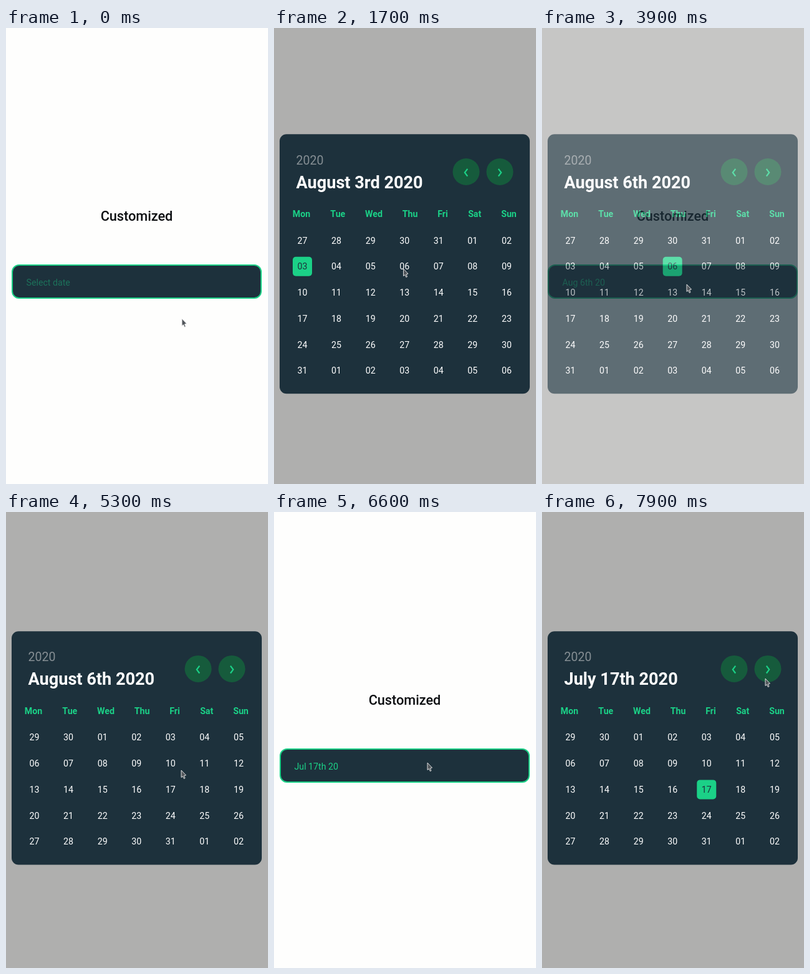
These frames come from a looping animation (420x731 px, 8000 ms). An HTML page:

```html
<!DOCTYPE html>
<html lang="en">
<head>
<meta charset="utf-8">
<title>Date picker</title>
<style>
  html, body { margin: 0; height: 100%; overflow: hidden; background: #fefefd; }
  svg { display: block; width: 100vw; height: 100vh; font: 14.2px Roboto, sans-serif; }
  .mid { text-anchor: middle; }
  .green { fill: #1bd187; }
  .dark { fill: #1d313c; }
  .white { fill: #fff; }
  .title { font-size: 21.7px; font-weight: 500; fill: #0b0d10; }
  .year { font-size: 19.5px; fill: #868f94; }
  .head { font-size: 27.1px; font-weight: 700; }
  .week { font-weight: 700; }
  .chev { fill: none; stroke: #1bd187; stroke-width: 2.2; }
</style>
</head>
<body>
<svg viewBox="0 0 420 731">
  <text class="title mid" x="209.5" y="308.6">Customized</text>
  <rect class="dark" x="10" y="380" width="399" height="53" rx="11" stroke="#1bd187" stroke-width="2"/>
  <text id="input" class="green" x="32.5" y="413"></text>
  <g id="modal">
    <rect width="420" height="731" fill="#000" opacity=".315"/>
    <g id="card"></g>
  </g>
  <path id="cursor" d="M0 0V11.5L2.4 9.6L4.3 13.5L6 12.7L4.4 8.8L7.5 8Z" fill="#50555a" stroke="#eee" stroke-width=".9"/>
</svg>
<script>
const LOOP = 8000, STEP = 100;
const ROW = 41.75, COL = 54.57;
const $ = id => document.getElementById(id);

const picks = [
  { from: 0, input: 'Select date', head: 'August 3rd 2020', date: new Date(2020, 7, 3) },
  { from: 2500, input: 'Aug 6th 20', head: 'August 6th 2020', date: new Date(2020, 7, 6) },
  { from: 5900, input: 'Jul 17th 20', head: 'July 17th 2020', date: new Date(2020, 6, 17) }
];
const months = [
  { from: 0, month: 6, first: 27, rows: 6 },
  { from: 4800, month: 5, first: 29, rows: 5 }
];
const week = [['Mon', 44], ['Tue', 102.3], ['Wed', 160], ['Thu', 218], ['Fri', 270.5], ['Sat', 321.7], ['Sun', 376.5]];

// Times at which the modal starts to open and to close
const fades = [[800, 2400], [3700, 5800], [6800, LOOP]];

// Cursor: time, x, y
const path = [
  [0, 282, 466], [500, 245, 409], [1400, 245, 409], [1700, 207.5, 386],
  [2400, 207.5, 386], [2700, 242, 466], [2800, 242, 468], [2900, 242, 468],
  [3300, 232, 411], [4100, 232, 411], [4500, 305, 240.5], [5000, 305, 240.5],
  [5300, 281, 414], [5700, 260.5, 449], [6100, 260.5, 449], [6600, 246, 402],
  [7200, 246, 402], [7700, 338, 305], [7900, 358, 267], [LOOP, 358, 267]
];

const active = (list, t) => list.filter(s => s.from <= t).pop();
const easeOut = p => Math.sin(Math.min(Math.max(p, 0), 1) * Math.PI / 2);
const smooth = p => p * p * (3 - 2 * p);
const text = (cls, x, y, s) => `<text class="${cls}" x="${x}" y="${y}">${s}</text>`;

function button(x, dir) {
  return `<circle cx="${x}" cy="230.5" r="21.5" fill="#165b3c"/>` +
    `<path class="chev" d="M${x - 2.2 * dir} 225.8L${x + 2.2 * dir} 231.7L${x - 2.2 * dir} 237.6"/>`;
}

function cardMarkup(pick, page) {
  let out = `<rect class="dark" x="9" y="170.3" width="401" height="${165.5 + ROW * page.rows}" rx="11"/>` +
    text('year', 35.5, 218.5, 2020) + text('head white', 35.5, 256.6, pick.head) +
    button(308, -1) + button(362, 1);
  for (const [name, x] of week) out += text('week green mid', x, 303, name);
  for (let i = 0; i < page.rows * 7; i++) {
    const day = new Date(2020, page.month, page.first + i);
    const chosen = +day === +pick.date;
    const x = 45.5 + i % 7 * COL, y = 340.5 + Math.floor(i / 7) * ROW;
    if (chosen) out += `<rect class="green" x="${x - 15.5}" y="${y - 15.5}" width="31" height="31" rx="5"/>`;
    out += text(chosen ? 'dark mid' : 'white mid', x, y + 5, String(day.getDate()).padStart(2, '0'));
  }
  return out;
}

function modalAlpha(t) {
  const span = fades.find(([open, close]) => t >= open && t < close + 300);
  return span ? easeOut((t - span[0]) / 400) * (1 - easeOut((t - span[1]) / 300)) : 0;
}

function cursorAt(t) {
  const i = path.findIndex(k => k[0] > t);
  const [t0, x0, y0] = path[i - 1], [t1, x1, y1] = path[i];
  const p = smooth((t - t0) / (t1 - t0));
  return [x0 + (x1 - x0) * p, y0 + (y1 - y0) * p];
}

let lastPick, lastPage;
function draw(t) {
  const pick = active(picks, t), page = active(months, t);
  if (pick !== lastPick || page !== lastPage) {
    $('input').textContent = pick.input;
    $('input').setAttribute('opacity', pick === picks[0] ? .4 : 1);
    $('card').innerHTML = cardMarkup(pick, page);
    $('card').setAttribute('transform', `translate(0 ${(6 - page.rows) * ROW / 2})`);
    lastPick = pick;
    lastPage = page;
  }
  $('modal').setAttribute('opacity', modalAlpha(t));
  $('cursor').setAttribute('transform', `translate(${cursorAt(t)})`);
}

let start;
function tick(now) {
  start ??= now;
  const t = (now - start) % LOOP;
  draw(Math.floor(t / STEP) * STEP);
  requestAnimationFrame(tick);
}
draw(0);
requestAnimationFrame(tick);
</script>
</body>
</html>
```
